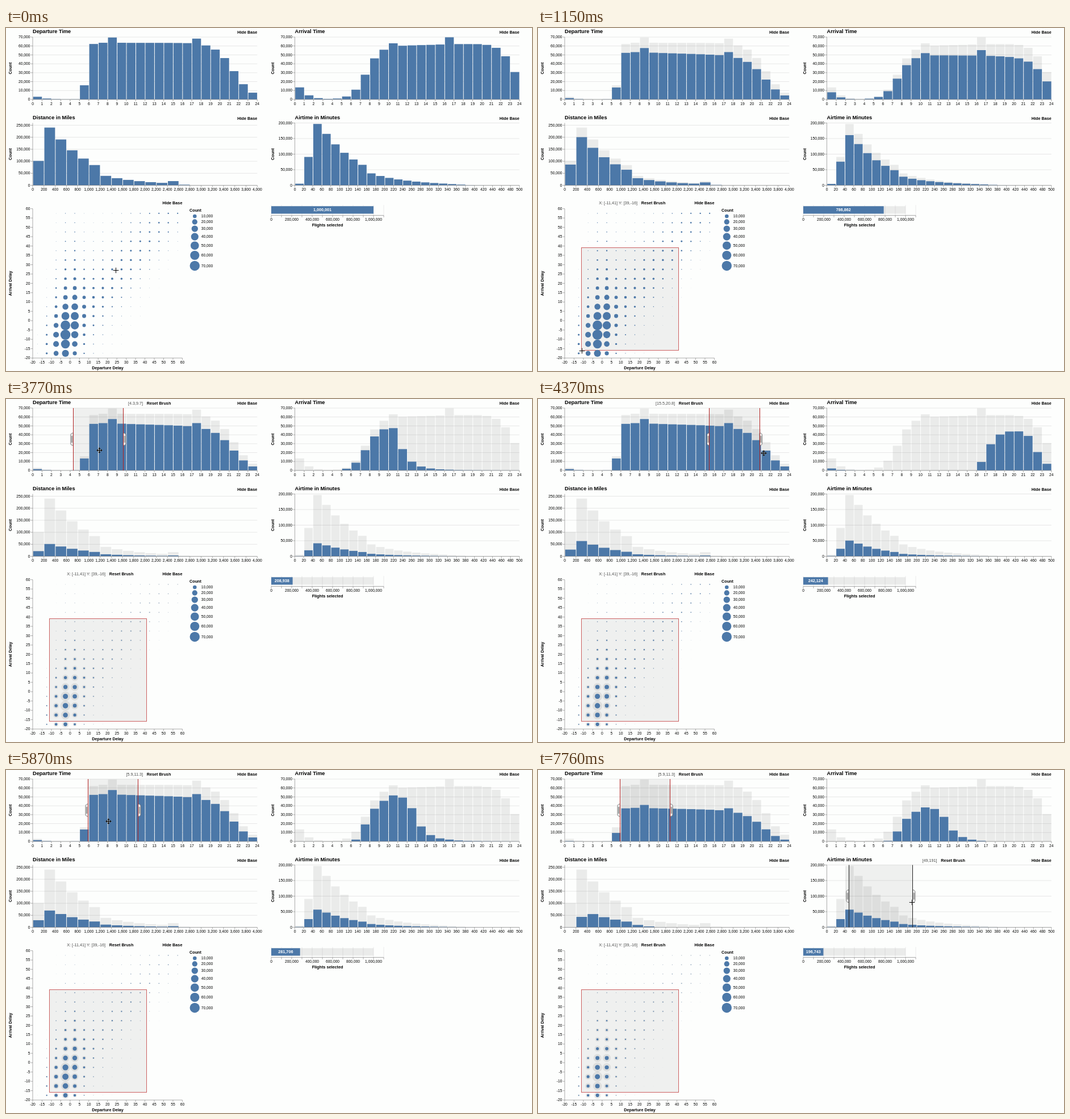
These frames come from a looping animation (926 by 605 pixels, 8000 ms). An HTML page with a canvas:

```html
<!DOCTYPE html>
<html lang="en">
<head>
<meta charset="utf-8">
<title>Flight delays</title>
<style>
html, body { margin: 0; width: 100%; height: 100%; overflow: hidden; background: #fdfefd; }
canvas { display: block; width: 926px; height: 605px; }
</style>
</head>
<body>
<canvas id="stage"></canvas>
<script>
const W = 926, H = 605, LOOP = 8000;
const PAPER = '#fdfefd', BLUE = '#4c78a8', BASE = 'rgba(0,0,0,.075)', SHADE = 'rgba(0,0,0,.055)';
const RED = '#b22222', DARK = '#222', GREY = '#4a4a4a';
const FONT = '"Liberation Sans", Arial, Helvetica, sans-serif';
const canvas = document.getElementById('stage');
const dpr = window.devicePixelRatio || 1;
canvas.width = W * dpr;
canvas.height = H * dpr;
const c = canvas.getContext('2d');
c.scale(dpr, dpr);

const rise = (x, mid, k) => 1 / (1 + Math.exp(-k * (x - mid)));
const fall = (x, mid, k) => 1 - rise(x, mid, k);
const bump = (x, mid) => Math.exp(-4 * (x - mid) ** 2);
const decay = (x, k) => Math.exp(-k * x);

// Linear track through x,y pairs
function at(p, x) {
  if (x <= p[0]) return p[1];
  for (let i = 2; i < p.length; i += 2)
    if (x <= p[i]) return p[i - 1] + (p[i + 1] - p[i - 1]) * (x - p[i - 2]) / (p[i] - p[i - 2]);
  return p[p.length - 1];
}

// Flights per hour and per bin, in thousands
const depAt = h => 3 * decay(h, 1.1) +
  (63.5 + 6 * bump(h, 8) + 6 * bump(h, 17)) * rise(h, 5.22, 5) * fall(h, 21, 1);
const arrAt = h =>
  (60.5 + .25 * (h - 11) + 4 * bump(h, 10) + 8 * bump(h, 16)) * rise(h, 7.1, 1.35) * fall(h, 22.95, 1.25);
const distAt = i =>
  (250 * decay(i - 1, .27) * (1 - .4 * rise(i, 5.5, 8)) + 11 * bump(i, 12)) * rise(i, .2, 4) * fall(i, 12.9, 3);
const airAt = i =>
  208 * decay(i - 2, .23) * (1 - .28 * rise(i, 7.6, 8)) * rise(i, 1.18, 3.5) * fall(i, 18.3, 1.2);

// Share left by the small and the full delay brush
const night = h => h < 4 ? h + 24 : h;
const byHour = start => [
  h => .17 * (1 - decay(Math.max(0, night(h) - start + .8), 1 / 6)),
  h => Math.max(.2, .845 - .005 * (night(h) - start) - .25 * ((night(h) - start) / 19) ** 8)
];
const bySize = [i => .12 + .003 * Math.min(i, 8), i => Math.max(.69, .85 - .016 * i)];

const LEFT = 47, RIGHT = 508.5, TOP = 16, MIDDLE = 167.5, CW = 395.3, CH = 110;
const chart = (title, x, y, n, unit, max, yStep, f, share) =>
  ({ title, x, y, n, unit, max, yStep, share, base: Array.from({ length: n }, (_, i) => f(i)) });
const dep = chart('Departure Time', LEFT, TOP, 24, 1, 70, 10, depAt, byHour(5));
const arr = chart('Arrival Time', RIGHT, TOP, 24, 1, 70, 10, h => arrAt(h) + arrAt(h + 24), byHour(6));
const dist = chart('Distance in Miles', LEFT, MIDDLE, 20, 200, 259.4, 50, distAt, bySize);
const air = chart('Airtime in Minutes', RIGHT, MIDDLE, 25, 20, 200, 50, airAt, bySize);

// The screen refreshes at these moments; the tracks are sampled there
const REFRESH = [0, 200, 590, 800, 1150, 1420, 1720, 1900, 2710, 2950, 3150, 3480, 3770, 4130, 4370,
  4730, 5120, 5510, 5870, 6140, 6430, 6600, 6780, 6960, 7350, 7550, 7760];
const POINTER_X = [0, 193, 200, 133, 590, 95, 1150, 77, 1420, 143, 1900, 117, 2710, 184, 3150, 206, 3480, 156,
  3770, 164, 4370, 397, 4730, 410, 5870, 180, 6140, 489, 6600, 595, 6960, 547, 7760, 658];
const POINTER_Y = [0, 427, 200, 474, 590, 524, 800, 565, 1150, 569, 1420, 375, 1900, 96, 2710, 96, 3770, 90,
  4370, 95, 5870, 90, 6140, 154, 6600, 230, 7760, 233];
const COUNT = [590, 121566, 800, 560000, 1150, 786862, 2710, 786862, 2950, 176300, 3480, 208938, 3770, 208938,
  4130, 272400, 4370, 242124, 4730, 151200, 5120, 259300, 5870, 281706, 6960, 281706, 7350, 139800, 7760, 196743];
const [, SMALL, , , , FULL] = COUNT, AIR_COUNT = COUNT[COUNT.length - 1];

function stateAt(t) {
  const s = {
    cur: [at(POINTER_X, t), at(POINTER_Y, t)],
    moving: t >= 3770 && t < 6140,
    drag: t < 3480,
    count: t < 590 ? 1000001 : Math.round(at(COUNT, t))
  };
  if (t >= 590) {
    s.mix = t < 2950 ? (s.count - SMALL) / (FULL - SMALL) : 1;
    s.xy = [Math.round(2 - 13 * s.mix), 41, 39, Math.round(9 - 25 * s.mix)];
  }
  if (t >= 2950) {
    const a = at([3770, 4.33, 4370, 15.48, 4730, 18.1, 5870, 5.92], t);
    s.dep = [a, a + at([2950, 4.5, 3480, 5.35], t)];
  }
  if (t >= 7350) s.air = [49, at([6960, 49, 7760, 191], t)];
  return s;
}

// Arrivals at hour h of flights that left between a and b
const landed = x => x > 0 ? 1 / (1 + (1.75 / x) ** 2.9) : 0;
function arrivals(leave, h, a, b) {
  let sum = 0;
  for (let d = a + .05; d < b; d += .1)
    sum += leave[Math.floor(d)] * (landed(h - d + .05) - landed(h - d - .05));
  return sum;
}

function select(s) {
  const pick = ch => ch.base.map((n, i) =>
    s.xy ? n * (ch.share[0](i) * (1 - s.mix) + ch.share[1](i) * s.mix) : n);
  const v = { dep: pick(dep), arr: pick(arr), dist: pick(dist), air: pick(air), dot: 1, mid: 13 };
  if (!s.dep) return v;
  const [a, b] = s.dep, leave = v.dep;
  const part = (s.air ? at(COUNT, 6960) : s.count) / FULL;
  v.mid = (a + b) / 2;
  const tilt = i => part * (1 + .004 * (Math.min(i, 7) - 2.5) * (13 - v.mid));
  v.arr = v.arr.map((n, i) => {
    const h = night(i) + .5, all = arrivals(leave, h, 0, 24);
    return all ? n * arrivals(leave, h, a, b) / all : 0;
  });
  v.dist = v.dist.map((n, i) => n * tilt(i));
  v.air = v.air.map((n, i) => n * tilt(i * .8));
  v.dot = Math.sqrt(part);
  if (s.air) {
    const some = s.count / AIR_COUNT, scale = 142 / (s.air[1] - s.air[0]);
    v.dep = v.dep.map((n, h) => n * some * (.71 - .4 * ((night(h) - 5) / 19) ** 8));
    v.arr = v.arr.map((n, h) => n * some * Math.max(0, .74 - .0006 * (h - 11) ** 4));
    v.dist = v.dist.map((n, i) => n * rise(i, .9, 5) * fall(i * scale, 6.9, 2.3));
    v.dot *= .82 * Math.sqrt(some);
  }
  return v;
}

function text(str, x, y, { size = 6.7, bold, align = 'center', color = '#000' } = {}) {
  c.font = `${bold ? 'bold ' : ''}${size}px ${FONT}`;
  c.textAlign = align;
  c.textBaseline = 'middle';
  c.fillStyle = color;
  c.fillText(str, x, y);
}
const bold = (str, x, y, align = 'center', size = 7.24, color = '#000') =>
  text(str, x, y, { size, bold: true, align, color });
const comma = n => n.toLocaleString('en-US');
const snap = n => Math.floor(n) + .5;

function line(x1, y1, x2, y2, color = '#888', width = .7) {
  c.strokeStyle = color;
  c.lineWidth = width;
  c.beginPath();
  c.moveTo(x1, y1);
  c.lineTo(x2, y2);
  c.stroke();
}

function rect(x, y, w, h, color) {
  c.fillStyle = color;
  c.fillRect(x, y, w, h);
}

function disc(x, y, r, color) {
  c.fillStyle = color;
  c.beginPath();
  c.arc(x, y, r, 0, 7);
  c.fill();
}

function upright(str, x, y) {
  c.save();
  c.translate(x, y);
  c.rotate(-Math.PI / 2);
  bold(str, 0, 0);
  c.restore();
}

function tickX(label, x, y) {
  line(x, y, x, y + 3.3);
  text(label, x, y + 8);
}

function tickY(label, x, y) {
  line(x - 3.3, y, x, y);
  text(label, x - 4.5, y + .3, { align: 'right' });
}

function brushLabel(label, right, y) {
  text(label, right - 49.2, y, { size: 7.24, align: 'right', color: GREY });
  bold('Reset Brush', right, y, 'right');
}

function handle(x, y, dir) {
  c.save();
  c.translate(x, y);
  c.scale(dir, 1);
  c.beginPath();
  c.moveTo(0, -11);
  c.quadraticCurveTo(4.5, -11, 4.5, -7);
  c.lineTo(4.5, 7);
  c.quadraticCurveTo(4.5, 11, 0, 11);
  c.closePath();
  c.fillStyle = '#eee';
  c.fill();
  c.strokeStyle = '#666';
  c.lineWidth = .8;
  c.stroke();
  line(1.6, -6, 1.6, 6, '#666');
  line(3, -6, 3, 6, '#666');
  c.restore();
}

function drawChart(ch, values, brush, color, digits) {
  const { x, y } = ch, bottom = y + CH, right = x + CW, w = CW / ch.n;
  const span = brush && brush.map(v => x + v / ch.unit * w);
  const bars = (list, fill) => list.forEach((n, i) => {
    const h = n / ch.max * CH;
    rect(x + i * w + .8, bottom - h, w - 1, h, fill);
  });
  for (let v = 0; v <= ch.max; v += ch.yStep) {
    const ty = bottom - v / ch.max * CH;
    line(x, ty, right, ty, '#ddd');
    tickY(comma(v * 1000), x, ty);
  }
  bars(ch.base, BASE);
  if (span) rect(span[0], y, span[1] - span[0], CH, SHADE);
  bars(values, BLUE);
  line(x, y, x, bottom);
  line(x, bottom, right, bottom);
  for (let i = 0; i <= ch.n; i++) tickX(comma(i * ch.unit), x + i * w, bottom);
  bold(ch.title, x, y - 9.2, 'left', 9.2);
  bold('Hide Base', right, y - 7.7, 'right');
  upright('Count', x - 38.5, y + 55);
  if (!span) return;
  span.forEach((bx, i) => {
    handle(bx, y + 55, i ? 1 : -1);
    line(snap(bx), y, snap(bx), bottom, color, 1);
  });
  brushLabel(`[${brush.map(v => v.toFixed(digits))}]`, right - 152, y - 7.7);
}

// Dots peak near zero delay and along the diagonal
function radius(i, j) {
  const peak = (2.9 - .12 * i) * rise(i, 1, 2) + 6.6 * Math.exp(-(((i - 3.25) / 1.35) ** 2));
  const d = j - Math.max(.75 * i, 1.08 * i - 1);
  const spread = d < 0 ? 3.5 - .06 * i : 3 + .1 * i;
  return peak / (1 + (d / spread) ** 2);
}

function scatter(v, s) {
  const x = 47, top = 318.7, size = 263.4, bottom = top + size, cell = size / 16;
  const px = n => x + (n + 20) / 5 * cell, py = n => bottom - (n + 20) / 5 * cell;
  if (s.xy) {
    const [x0, x1, y1, y0] = s.xy;
    const left = snap(px(x0)), up = snap(py(y1));
    const box = [left, up, snap(px(x1)) - left, snap(py(y0)) - up];
    rect(...box, SHADE);
    c.strokeStyle = '#cb6060';
    c.lineWidth = 1;
    c.strokeRect(...box);
    brushLabel(`X: [${x0},${x1}] Y: [${y1},${y0}]`, 224.3, 309.5);
  }
  for (let i = 0; i < 16; i++) for (let j = 0; j < 16; j++) {
    const r = radius(i, j), cx = x + (i + .5) * cell, cy = bottom - (j + .5) * cell;
    if (r < .22) continue;
    const late = 1 + (v.mid - 13) * .06 * ((i + j) / 30 - .3);
    disc(cx, cy, r, BASE);
    disc(cx, cy, r * v.dot * late, BLUE);
  }
  line(x, top, x, bottom);
  line(x, bottom, x + size, bottom);
  for (let n = -20; n <= 60; n += 5) {
    tickX(n, px(n), bottom);
    tickY(n, x, py(n));
  }
  bold('Hide Base', 310.4, 309.5, 'right');
  bold('Departure Delay', 179, 600.5);
  upright('Arrival Delay', 8.5, 450.5);
  legend(332.3, 332);
}

function legend(x, y) {
  bold('Count', x - 9.3, y - 10, 'left');
  let last = 0;
  for (let n = 1; n <= 7; n++) {
    const r = 8.7 * Math.sqrt(n / 7), half = Math.max(3.6, r);
    if (last) y += last + half + 1.75;
    last = half;
    disc(x, y, r, BLUE);
    text(comma(n * 10000), x + 11.5, y + .3, { align: 'left' });
  }
}

function total(count) {
  const x = 467, y = 314.3, step = 18, w = count / 1e5 * step;
  for (let i = 0; i <= 11; i++) line(x + i * step, 312.3, x + i * step, 330.5, '#e2e2e2');
  rect(x, y, 10 * step, 13.2, BASE);
  rect(x, y, w, 13.2, BLUE);
  line(x, 330.5, x + 11 * step, 330.5);
  for (let i = 0; i <= 11; i++) tickX(i % 2 ? '' : comma(i * 1e5), x + i * step, 330.5);
  bold('Flights selected', 566, 348.5);
  if (count > 150000) bold(comma(count), x + w / 2, 321, 'center', 7.24, '#fff');
  else text(comma(count), x + w + 6.6, 321, { size: 7.24, align: 'left' });
}

function cursor([x, y], moving) {
  const arm = 4.8;
  x = snap(x);
  y = snap(y);
  for (const [color, width] of [['rgba(255,255,255,.7)', 2.4], ['#000', moving ? 1.3 : 1]]) {
    line(x - arm, y, x + arm, y, color, width);
    line(x, y - arm, x, y + arm, color, width);
  }
  if (!moving) return;
  for (let k = 0; k < 4; k++) {
    c.save();
    c.translate(x, y);
    c.rotate(k * Math.PI / 2);
    c.beginPath();
    c.moveTo(5, 0);
    c.lineTo(2.7, -2.2);
    c.lineTo(2.7, 2.2);
    c.closePath();
    c.fillStyle = '#000';
    c.fill();
    c.restore();
  }
}

function draw(s) {
  const v = select(s);
  rect(0, 0, W, H, PAPER);
  drawChart(dep, v.dep, s.dep, s.drag ? DARK : RED, 1);
  drawChart(arr, v.arr);
  drawChart(dist, v.dist);
  drawChart(air, v.air, s.air, DARK, 0);
  scatter(v, s);
  total(s.count);
  cursor(s.cur, s.moving);
}

let shown = -1;
function tick() {
  const now = performance.now() % LOOP;
  const t = REFRESH.filter(start => start <= now).pop();
  if (t !== shown) draw(stateAt(shown = t));
  requestAnimationFrame(tick);
}
tick();
</script>
</body>
</html>
```
